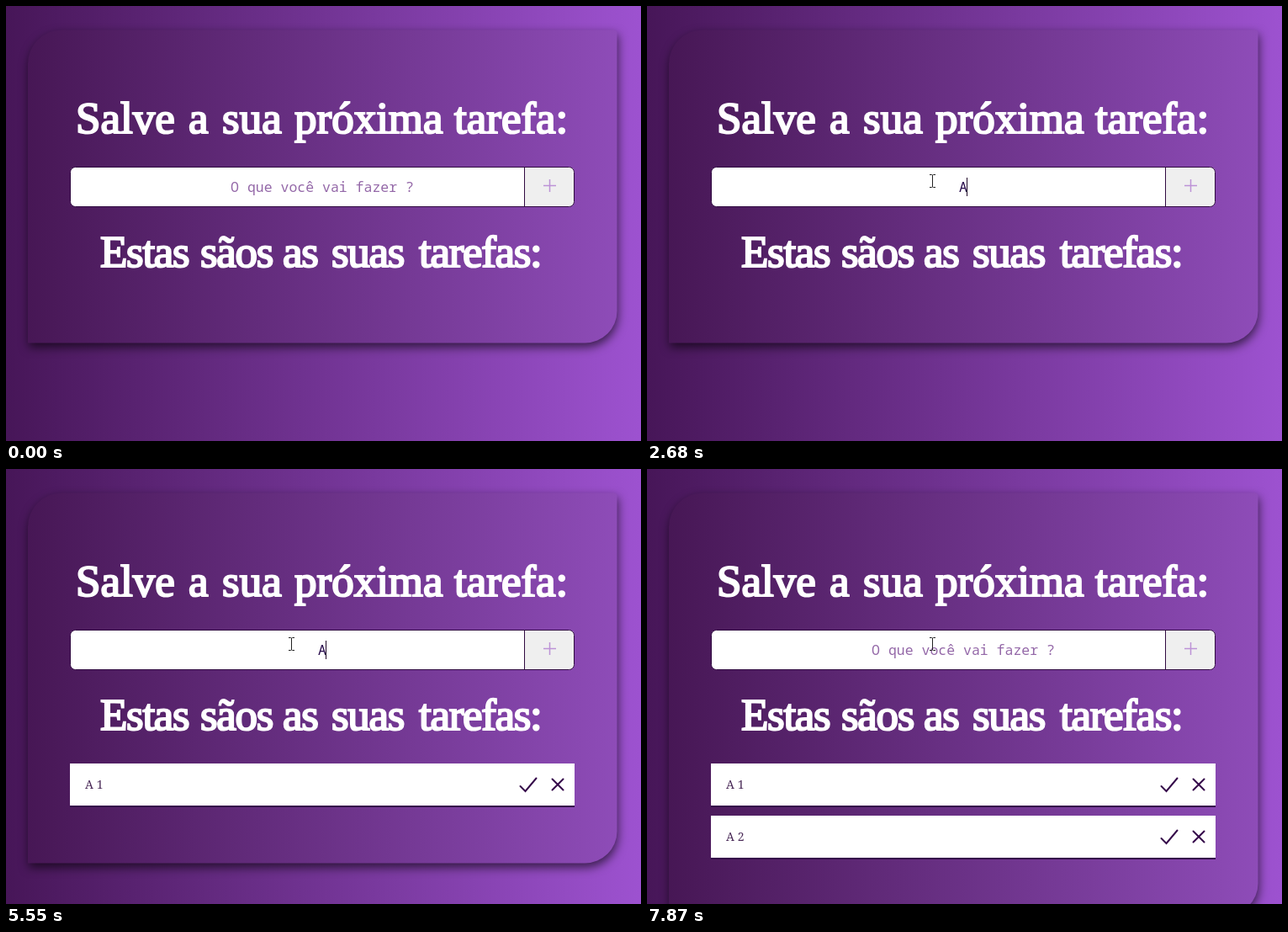
These frames come from a looping animation (755 px wide and 517 px high, 8000 ms). An HTML page:

```html
<!DOCTYPE html>
<html lang="pt">
<head>
<meta charset="utf-8">
<title>Lista de tarefas</title>
<style>
  html, body { margin: 0; width: 100%; height: 100%; overflow: hidden; background: #471658; }
  svg { display: block; }
  text { white-space: pre; }
  .heading { font: 53px "Liberation Serif", serif; fill: #fff; stroke: #fff; stroke-width: 2.2; }
  .tight { letter-spacing: -1.3px; }
  .field { font: 16.5px "Noto Sans Mono", monospace; text-anchor: middle; }
  .label { font: bold 16px "Liberation Serif", serif; fill: #35104a; }
  .label.styled { font: 14px "Noto Serif", serif; letter-spacing: 4px; fill: #4a2a58; }
  .icon { fill: none; stroke: #35084a; stroke-width: 2; stroke-linecap: round; }
</style>
</head>
<body>
<svg width="755" height="517" viewBox="0 0 755 517">
  <defs>
    <linearGradient id="pageFill">
      <stop stop-color="#471658"/><stop offset="1" stop-color="#9d52d0"/>
    </linearGradient>
    <linearGradient id="cardFill">
      <stop stop-color="#471755"/><stop offset="1" stop-color="#8e4cb8"/>
    </linearGradient>
    <filter id="shadow" filterUnits="userSpaceOnUse" x="0" y="0" width="755" height="580"
            color-interpolation-filters="sRGB">
      <feDropShadow dx="1" dy="5" stdDeviation="6" flood-color="#000" flood-opacity=".62"/>
    </filter>
  </defs>

  <rect width="755" height="517" fill="url(#pageFill)"/>
  <path id="card" fill="url(#cardFill)" filter="url(#shadow)"/>

  <text class="heading" y="151">
    <tspan x="83">Salve</tspan><tspan x="217">a</tspan><tspan x="257">sua</tspan><tspan x="343">próxima</tspan><tspan x="533">tarefa:</tspan>
  </text>
  <text class="heading tight" y="310">
    <tspan x="112">Estas</tspan><tspan x="231">sãos</tspan><tspan x="329">as</tspan><tspan x="387">suas</tspan><tspan x="491">tarefas:</tspan>
  </text>

  <rect x="76.5" y="191.5" width="599" height="47" rx="6" fill="#fff"/>
  <path d="M616.5 191.5H669.5a6 6 0 0 1 6 6v35a6 6 0 0 1-6 6H616.5z" fill="#efefef"/>
  <path d="M616.5 191.5v47" stroke="#2f0a40"/>
  <rect x="76.5" y="191.5" width="599" height="47" rx="6" fill="none" stroke="#2f0a40"/>
  <path d="M639 213.5h15M646.5 206v15" stroke="#bd92d6" stroke-width="1.5"/>
  <text id="field" class="field" x="376" y="221"></text>
  <path id="caret" stroke="#1c0626"/>

  <g id="tasks"></g>

  <circle id="halo" cx="337" cy="207" r="12" fill="#f6ec50" style="mix-blend-mode:multiply"/>
  <path id="arrow" d="M.5.5v16l3.7-3.5 2.5 5.5 2.3-1-2.5-5.4h5z" fill="#fff" stroke="#111"/>
  <path id="beam" d="M-3.5-7.5H-1L0-7 1-7.5H3.5M0-7V7M-3.5 7.5H-1L0 7 1 7.5H3.5" fill="none" stroke="#222"/>
</svg>
<script>
const LOOP = 8000;
const PLACEHOLDER = 'O que você vai fazer ?';
const byId = id => document.getElementById(id);
const show = (node, on) => node.setAttribute('display', on ? 'inline' : 'none');
const mix = (a, b, k) => a + (b - a) * k;

// [start, field text]
const typing = [[0, ''], [2680, 'A'], [3430, 'A1'], [4290, ''], [5550, 'A'], [6270, 'A2'], [6950, '']];
// [on, off]
const caretSpans = [[1830, 2350], [2680, 3230], [3430, 3960], [4490, 5020],
                    [5550, 6010], [6270, 6800], [7340, 7870]];
const tasks = [
  { name: 'A1', added: 4290, styled: 4360 },
  { name: 'A2', added: 6950, styled: 6950 }
];

byId('tasks').innerHTML = tasks.map((task, i) => `
  <g transform="translate(0 ${62 * i})">
    <rect x="76" y="350" width="600" height="52" fill="#35084a"/>
    <rect x="76" y="350" width="600" height="50" fill="#fff"/>
    <text class="label" x="94" y="380">${task.name}</text>
    <path class="icon" d="M611.5 377L617.5 383L630.5 367.5M649.5 368.5L662.5 381.5M662.5 368.5L649.5 381.5"/>
  </g>`).join('');
const rows = [...byId('tasks').children];

function cardPath(bottom) {
  return `M26 68.5a40 40 0 0 1 40-40H722.5a4 4 0 0 1 4 4V${bottom - 38}a38 38 0 0 1-38 38H26z`;
}

// The pointer advances in discrete steps: into the card, then up to the field.
function pointerAt(t) {
  if (t < 940) {
    const k = Math.min(3, Math.floor((t - 520) / 73.3)) / 3;
    const eased = 1 - (1 - k) ** 1.5;
    return [mix(565, 402, eased), mix(402, 249, eased)];
  }
  const k = Math.min(7, Math.floor((t - 940) / 70) + 1) / 7;
  const eased = k * k * (3 - 2 * k);
  return [mix(402, 339.5, eased), mix(249, 208, eased)];
}

function render(t) {
  const value = typing.filter(([start]) => t >= start).pop()[1];
  const field = byId('field');
  field.textContent = value || PLACEHOLDER;
  field.setAttribute('fill', value ? '#26084a' : '#9468a8');

  const caretX = Math.floor(376 + value.length * 4.95) + .5;
  byId('caret').setAttribute('d', `M${caretX} 204v22`);
  show(byId('caret'), caretSpans.some(([on, off]) => t >= on && t < off));

  const count = tasks.filter(task => t >= task.added).length;
  byId('card').setAttribute('d', cardPath(count ? 406.5 + 62 * count : 400.5));
  rows.forEach((row, i) => {
    show(row, i < count);
    row.querySelector('text').classList.toggle('styled', t >= tasks[i].styled);
  });

  const [x, y] = pointerAt(t);
  const overField = y < 239;
  for (const id of ['arrow', 'beam']) {
    byId(id).setAttribute('transform', `translate(${x} ${y})`);
    show(byId(id), t >= 520 && overField === (id === 'beam'));
  }
  show(byId('halo'), t >= 1830 && t < 2020);
}

const began = performance.now();
function tick() {
  render((performance.now() - began) % LOOP);
  requestAnimationFrame(tick);
}
tick();
</script>
</body>
</html>
```
